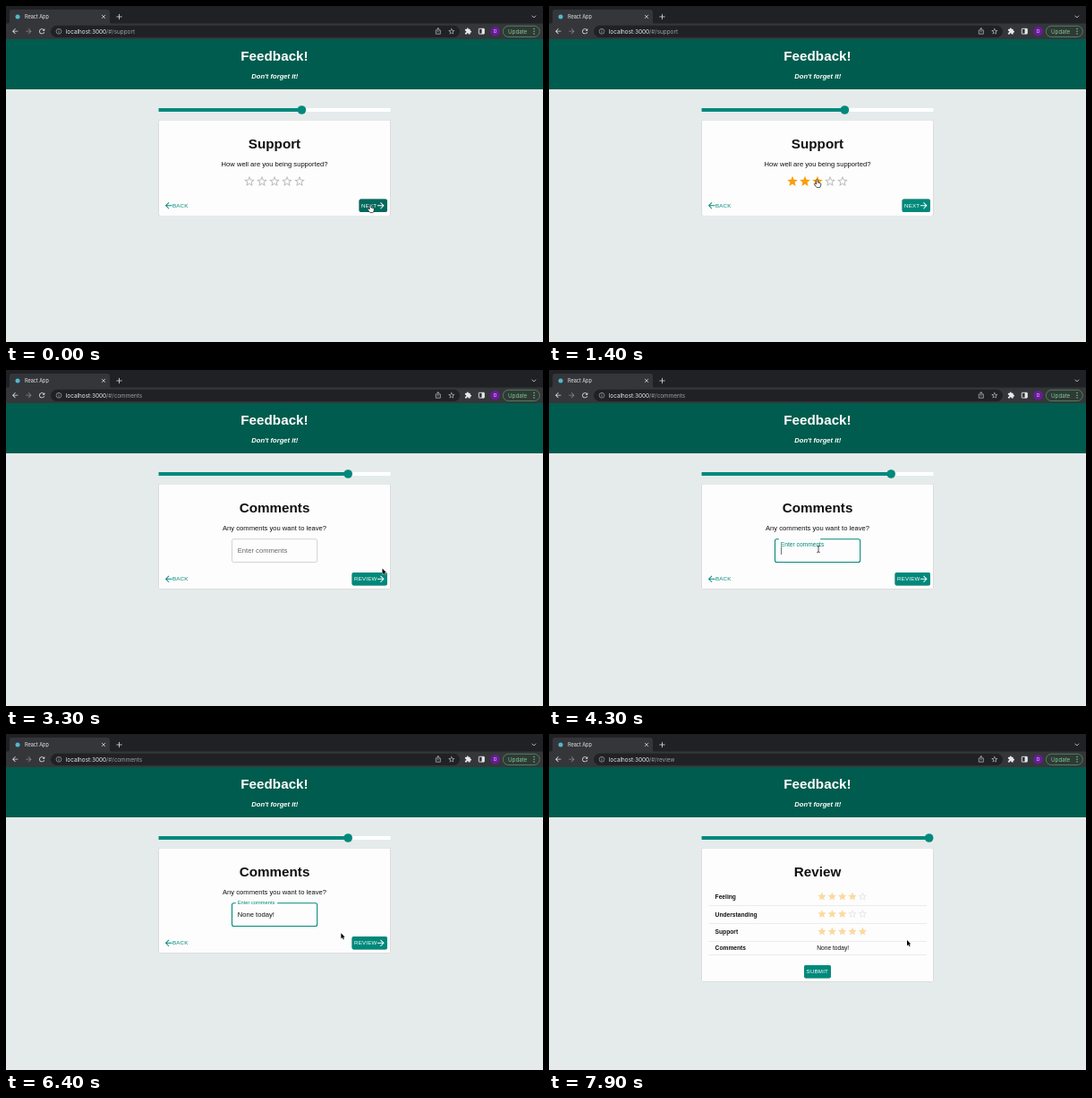
Animation, 600 px wide and 375 px high, one loop 8000 ms. Source, as an HTML page:

```html
<!DOCTYPE html>
<html lang="en">
<head>
<meta charset="utf-8">
<title>Feedback</title>
<style>
  html, body { margin: 0; width: 100%; height: 100%; overflow: hidden; background: #e5ebeb; }
  svg { display: block; width: 100vw; height: 100vh; }
  text { font-family: "Liberation Sans", Arial, sans-serif; white-space: pre; }
  .ui { font-family: Inter, Roboto, sans-serif; }
  .b { font-weight: bold; }
  .i { font-style: italic; }
  .btn { letter-spacing: .028em; }
  .mid { text-anchor: middle; }
  .card { filter: drop-shadow(0 .8px .6px rgba(0, 0, 0, .4)); }
  .line { fill: none; stroke-linecap: round; stroke-linejoin: round; }
</style>
</head>
<body>
<svg viewBox="0 0 600 375"><g id="frame"></g><g id="page"></g></svg>
<script>
const LOOP = 8000, STEP = 100;
const TEAL = '#00897b', DARK = '#00695c', INK = '#111';
const STAR = 'M12 17.27 18.18 21l-1.64-7.03L22 9.24l-7.19-.61L12 2 9.19 8.63 2 9.24l5.46 4.73L5.82 21z';
const HOLLOW = STAR + 'M12 15.4l-3.76 2.27 1-4.28-3.32-2.88 4.38-.38L12 6.1l1.71 4.04 4.38.38-3.32 2.88 1 4.28z';
const ARROW = 'M12 4l-1.41 1.41L16.17 11H4v2h12.17l-5.58 5.59L12 20l8-8z';
const RELOAD = 'M17.65 6.35A7.96 7.96 0 0 0 12 4a8 8 0 1 0 7.73 10h-2.08A6 6 0 1 1 12 6c1.66 0 3.14.69 4.22 1.78L13 11h7V4z';
const PUZZLE = 'M20.5 11H19V7a2 2 0 0 0-2-2h-4V3.5a2.5 2.5 0 0 0-5 0V5H4a2 2 0 0 0-2 2v3.8h1.5a2.7 2.7 0 0 1 0 5.4H2V20a2 2 0 0 0 2 2h3.8v-1.5a2.7 2.7 0 0 1 5.4 0V22H17a2 2 0 0 0 2-2v-4h1.5a2.5 2.5 0 0 0 0-5z';
const POINTER = 'M0 0V6.2L1.5 4.9 2.5 7.2 3.5 6.8 2.5 4.5H4.4z';
const HAND = 'M-.9.6a.9.9 0 0 1 1.8 0V3l2.6.6q1 .3.9 1.3L4 7q-.2 1.6-1.5 1.6H.3q-.8 0-1.3-.8L-3 5q-.4-.8.3-1.1.6-.2 1.1.3l.7.8z';

// Event times in ms
const RATE = 1900, URL2 = 2800, PAGE2 = 2900, FOCUS = 4200, TYPE = 4400,
      SHOW = 6000, BLUR = 6900, URL3 = 7000, PAGE3 = 7100;

// Mouse path: time, x, y
const MOUSE = [
  [0, 407, 222], [500, 406, 222], [1000, 277, 196], [1400, 299.5, 194], [1800, 328, 195],
  [2000, 330, 195], [2200, 350, 202], [2700, 417, 222], [3300, 420.5, 221.5], [3500, 416, 220],
  [4100, 301, 200], [6000, 301, 200], [6600, 400, 230], [8000, 400, 230]
];

const text = (s, x, y, size, fill = INK, cls = '', more = '') =>
  `<text x="${x}" y="${y}" font-size="${size}" fill="${fill}" class="${cls}" ${more}>${s}</text>`;
const rect = (x, y, w, h, fill, r = 0, more = '') =>
  `<rect x="${x}" y="${y}" width="${w}" height="${h}" rx="${r}" fill="${fill}" ${more}/>`;
const circle = (x, y, r, fill, more = '') => `<circle cx="${x}" cy="${y}" r="${r}" fill="${fill}" ${more}/>`;
const line = (d, stroke, w) => `<path d="${d}" class="line" stroke="${stroke}" stroke-width="${w}"/>`;
const icon = (d, x, y, size, fill, flip = 1) =>
  `<path d="${d}" fill="${fill}" fill-rule="evenodd" transform="translate(${x} ${y}) scale(${flip * size / 24} ${size / 24}) translate(-12 -12)"/>`;

function browser() {
  const pale = '#dcdde0';
  return rect(0, 0, 600, 20, '#202124')
    + '<path d="M2 20q2 0 2-3V7q0-3 3-3h106q3 0 3 3v10q0 3 2 3z" fill="#35363a"/>'
    + rect(0, 19.5, 600, 17.5, '#35363a')
    + circle(13, 12, 2.5, '#4fb8cf')
    + text('React App', 21, 14, 5.5, '#e8eaed', 'ui')
    + line('M107.3 10.2l3.4 3.4m0-3.4l-3.4 3.4', pale, .8)
    + line('M123.8 12h5.4m-2.7-2.7v5.4', pale, .8)
    + line('M587.8 11l2 2 2-2', pale, .8)
    + icon(ARROW, 10.2, 28.2, 9.5, pale, -1)
    + icon(ARROW, 25.3, 28.2, 9.5, '#85868a')
    + icon(RELOAD, 40.2, 28.2, 9.2, pale)
    + rect(50, 21.7, 457, 13.2, '#202124', 6.6)
    + circle(59, 28.3, 2.9, 'none', 'stroke="#a6a8ac" stroke-width=".7"')
    + line('M59 28v1.6M59 26.7v.05', '#a6a8ac', .7)
    + line('M481.3 27h-1v4.2h5V27h-1M482.8 29v-4.2m-1.4 1.3l1.4-1.4 1.4 1.4', '#c4c6ca', .7)
    + icon(HOLLOW, 497.8, 28.2, 8.6, '#c4c6ca')
    + icon(PUZZLE, 516.3, 28.2, 8.2, '#e8eaed')
    + rect(528.3, 25.3, 6, 5.8, 'none', .5, 'stroke="#e8eaed" stroke-width=".9"')
    + rect(531.6, 25.3, 2.7, 5.8, '#e8eaed')
    + circle(546.5, 28.2, 5.3, '#6a1b9a')
    + text('D', 546.5, 30.1, 5.2, '#e8dcf0', 'ui mid')
    + rect(555.3, 22.3, 41, 12.2, '#2f3a35', 6.1, 'stroke="#5b9c72" stroke-width=".7"')
    + text('Update', 561, 30.5, 6.2, '#81c995', 'ui')
    + [25.4, 28.2, 31].map(y => circle(590, y, .75, '#81c995')).join('')
    + rect(0, 37, 600, 56, '#005c4e')
    + text('Feedback!', 300, 61.2, 15.24, '#fff', 'b mid')
    + text("Don't forget it!", 300.3, 81.4, 7.62, '#fff', 'b i mid');
}

const slider = x => rect(170.5, 114, 259, 4, '#fff') + rect(170.5, 114, x - 170.5, 4, TEAL) + circle(x, 116, 4.8, TEAL);

const card = (bottom, title) => rect(170.5, 127.3, 259, bottom - 127.3, '#fdfdfd', 2, 'class="card"')
  + text(title, 300, 159, 15.24, INK, 'b mid');

function stars(x, y, pitch, count) {
  let out = '';
  for (let i = 0; i < 5; i++)
    out += icon(i < count ? STAR : HOLLOW, x + i * pitch, y, pitch, i < count ? '#f99f0c' : '#b9b9b9');
  return out;
}

const button = (label, x, y, w, fill) => rect(x, y, w, 14.6, fill, 2, 'class="card"')
  + text(label, x + 2.6, y + 9.4, 6.19, '#fff', 'btn');

const nav = (label, x, y, hover) => icon(ARROW, 181.7, y + 7.3, 11.4, TEAL, -1)
  + text('BACK', 186, y + 9.4, 6.19, TEAL, 'btn')
  + button(label, x, y, 426 - x, hover ? DARK : TEAL)
  + icon(ARROW, 418.8, y + 7.3, 11.4, '#fff');

const inside = (m, x, y, w, h) => m.x >= x && m.x <= x + w && m.y >= y && m.y <= y + h;

function mouseAt(t) {
  const i = MOUSE.findIndex(p => p[0] > t);
  const [t0, x0, y0] = MOUSE[i - 1], [t1, x1, y1] = MOUSE[i];
  let p = (t - t0) / (t1 - t0);
  p = p * p * (3 - 2 * p);
  return { x: x0 + (x1 - x0) * p, y: y0 + (y1 - y0) * p };
}

function support(t, m) {
  const over = inside(m, 265, 188, 70, 15), next = inside(m, 394.5, 215.5, 31.5, 14.6);
  const count = over ? Math.ceil((m.x - 265) / 14) : t >= RATE ? 5 : 0;
  m.hand = over || next;
  return slider(330.4) + card(234, 'Support')
    + text('How well are you being supported?', 300, 179.3, 7.62, INK, 'mid')
    + stars(272, 195.7, 14, count) + nav('NEXT', 394.5, 215.5, next);
}

function comments(t, m) {
  const review = inside(m, 386.5, 226, 39.5, 14.6), focus = t >= FOCUS && t < BLUR;
  const lift = Math.min(1, Math.max(0, (t - FOCUS) / 200));
  const typed = 'None today!'.slice(0, Math.max(0, Math.floor((t - TYPE) / 110)));
  const caret = focus && (t < 5700 || Math.floor((t - 5700) / 500) % 2 === 0);
  m.hand = review;
  m.beam = inside(m, 252.5, 188.5, 95.5, 26);
  return slider(382.2) + card(244.5, 'Comments')
    + text('Any comments you want to leave?', 300, 179.3, 7.62, INK, 'mid')
    + rect(252.5, 188.7, 95.2, 25.8, 'none', 2, `stroke="${focus ? TEAL : '#b8b8b8'}" stroke-width="${focus ? 1.1 : .6}"`)
    + (lift ? rect(256.8, 187.5, 46.4, 2.4, '#fdfdfd') : '')
    + text('Enter comments', 258.8, 204 - 13.6 * lift, 7.62 - 1.91 * lift, focus ? TEAL : '#666')
    + text(typed, 258.8, 204.3, 7.62, INK, '', 'id="typed"')
    + (caret ? rect(258.8, 197.3, .6, 8.6, INK, 0, 'id="caret"') : '')
    + nav('REVIEW', 386.5, 226, review);
}

function review() {
  const rows = [['Feeling', 181.3, 191.5, 4], ['Understanding', 200.8, 211.5, 3], ['Support', 220.3, 231.3, 5], ['Comments', 238.3, 246.5]];
  return slider(424.7) + card(276.3, 'Review')
    + rows.map(([name, y, rule, n]) => text(name, 185.6, y + 3.1, 6.67, INK, 'b')
      + rect(178.5, rule, 243.5, .5, '#d8d8d8')
      + (n ? `<g opacity=".38">${stars(305, y, 11.35, n)}</g>` : text('None today!', 299.2, y + 3.1, 6.67))).join('')
    + button('SUBMIT', 285, 258, 30, TEAL);
}

function cursor(m) {
  const shape = m.beam ? line('M-1.3-3.6Q0-3.6 0-2.8V2.8Q0 3.6-1.3 3.6M1.3-3.6Q0-3.6 0-2.8M0 2.8Q0 3.6 1.3 3.6', INK, .7)
    : m.hand ? `<path d="${HAND}" fill="#fff" stroke="#111" stroke-width=".7"/>`
    : `<path d="${POINTER}" fill="#000" stroke="#fff" stroke-width=".8" paint-order="stroke"/>`;
  return `<g transform="translate(${m.x} ${m.y})">${shape}</g>`;
}

const frame = document.getElementById('frame'), page = document.getElementById('page');
frame.innerHTML = browser();

function draw(t) {
  const m = mouseAt(t);
  const route = t < URL2 ? 'support' : t < URL3 ? 'comments' : 'review';
  const view = t < PAGE2 ? support : t < PAGE3 ? comments : review;
  page.innerHTML = text(`localhost:3000<tspan fill="#9aa0a6">/#/${route}</tspan>`, 66.8, 30.5, 6.4, '#e8eaed', 'ui')
    + view(t, m) + (t >= TYPE && t < SHOW ? '' : cursor(m));
  const caret = document.getElementById('caret');
  if (caret) caret.setAttribute('x', 259 + document.getElementById('typed').getComputedTextLength());
}

let last = -1;
function tick() {
  const t = Math.floor(performance.now() % LOOP / STEP) * STEP;
  if (t !== last) draw(last = t);
  requestAnimationFrame(tick);
}
tick();
</script>
</body>
</html>
```
